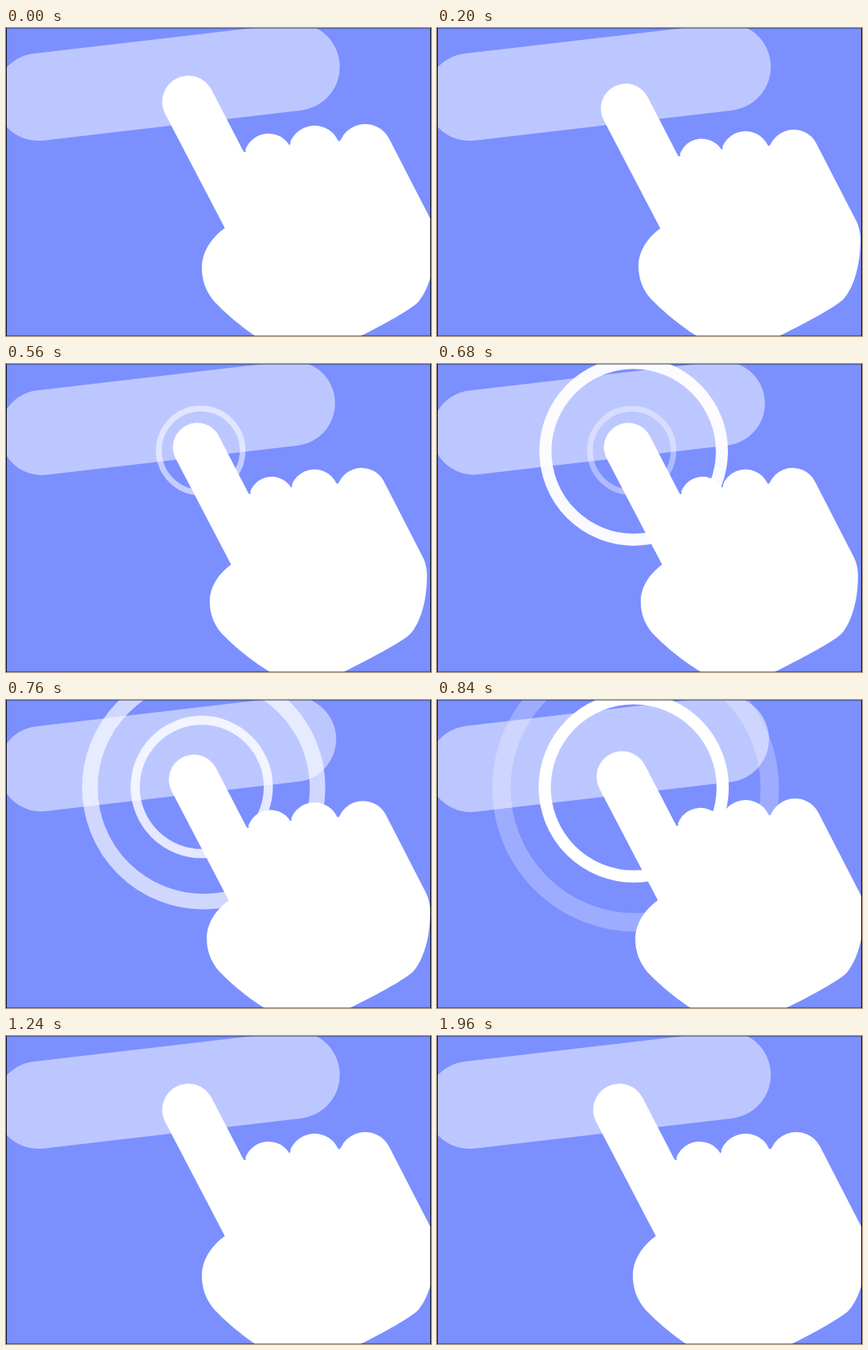
Recreate the animation shown at these times as an HTML page with a canvas. Size 536 by 388 pixels, loop 2 s.

```html
<!DOCTYPE html>
<html lang="en">
<head>
<meta charset="utf-8">
<title>Tap</title>
<style>
html, body { margin: 0; width: 100%; height: 100%; overflow: hidden; background: #7b8fff; }
canvas { display: block; width: 536px; height: 388px; }
</style>
</head>
<body>
<canvas id="stage" width="536" height="388"></canvas>
<script>
const W = 536, H = 388, LOOP = 2000, STEP = 40;
const ctx = document.getElementById('stage').getContext('2d');

const span = (t, a, b) => Math.min(1, Math.max(0, (t - a) / (b - a)));
const smooth = p => p * p * (3 - 2 * p);

// cubic-bezier(0, 0, .58, 1)
function easeOut(p) {
  let lo = 0, hi = 1;
  for (let i = 0; i < 24; i++) {
    const u = (lo + hi) / 2;
    if (1.74 * u * u - 0.74 * u * u * u < p) lo = u; else hi = u;
  }
  return smooth(lo);
}

function handPath() {
  const p = new Path2D();
  const tilt = -0.482;
  p.moveTo(276, 252);
  p.arc(230, 93, 33, Math.PI + tilt, tilt + 2 * Math.PI);
  p.lineTo(299, 154.5);
  p.quadraticCurveTo(301, 158.5, 303, 154.5);
  p.arc(331, 164, 31, Math.PI + 0.32, -0.56);
  p.quadraticCurveTo(358, 148.5, 359, 144);
  p.arc(389, 156, 33, Math.PI + 0.38, -0.44);
  p.quadraticCurveTo(420.5, 143.5, 422, 141);
  p.arc(453, 155, 34, Math.PI + 0.42, tilt);
  p.lineTo(535, 240);
  p.bezierCurveTo(541, 251, 542, 262, 541.5, 272);
  p.bezierCurveTo(541, 305, 531, 333, 519, 346);
  p.bezierCurveTo(511, 354, 478, 373, 447, 388);
  p.lineTo(418, 403);
  p.lineTo(340, 405);
  p.lineTo(314, 388);
  p.quadraticCurveTo(285, 368, 263, 345);
  p.bezierCurveTo(252, 332, 247, 318, 247, 302);
  p.bezierCurveTo(247, 283, 258, 265, 276, 252);
  p.closePath();
  return p;
}

function pillPath() {
  const p = new Path2D(), r = 55, a = -0.1165;
  p.arc(366, 49, r, a - Math.PI / 2, a + Math.PI / 2);
  p.arc(41, 87, r, a + Math.PI / 2, a + Math.PI * 1.5);
  p.closePath();
  return p;
}

const hand = handPath(), pill = pillPath();

function fillScaled(path, color, scale, cx, cy) {
  ctx.save();
  ctx.translate(cx, cy);
  ctx.scale(scale, scale);
  ctx.translate(-cx, -cy);
  ctx.fillStyle = color;
  ctx.fill(path);
  ctx.restore();
}

function ring(t, start, end, peak, gone) {
  const r = 205 * easeOut(span(t, start, end));
  const alpha = t < peak ? smooth(span(t, start, peak)) : 1 - smooth(span(t, peak, gone));
  if (r <= 0 || alpha <= 0) return;
  const width = r * 0.128;
  ctx.lineWidth = width;
  ctx.strokeStyle = `rgba(255,255,255,${alpha})`;
  ctx.beginPath();
  ctx.arc(243.4 + r * 0.039, 108.2 + r * 0.015, r - width / 2, 0, 2 * Math.PI);
  ctx.stroke();
}

function edges() {
  ctx.fillStyle = 'rgba(0,0,0,.38)';
  ctx.fillRect(0, 0, W, 1);
  ctx.fillRect(0, H - 1, W, 1);
  ctx.fillStyle = 'rgba(0,0,0,.9)';
  ctx.fillRect(0, 0, 1, H);
  ctx.fillRect(W - 1, 0, 1, H);
}

function draw(t) {
  const release = easeOut(span(t, 680, 1000));
  const press = easeOut(span(t, 20, 360)) - release;
  const squeeze = easeOut(span(t, 360, 680)) - release;

  ctx.fillStyle = '#7b8fff';
  ctx.fillRect(0, 0, W, H);
  fillScaled(pill, '#bdc7ff', 1 - 0.034 * squeeze, 203, 68);
  ring(t, 468, 988, 640, 940);
  ring(t, 560, 1240, 840, 1240);
  fillScaled(hand, '#fff', 1 - 0.07 * press, 389, 262);
  edges();
}

function tick() {
  const t = performance.now() % LOOP;
  draw(Math.floor(t / STEP) * STEP);
  requestAnimationFrame(tick);
}
tick();
</script>
</body>
</html>
```
